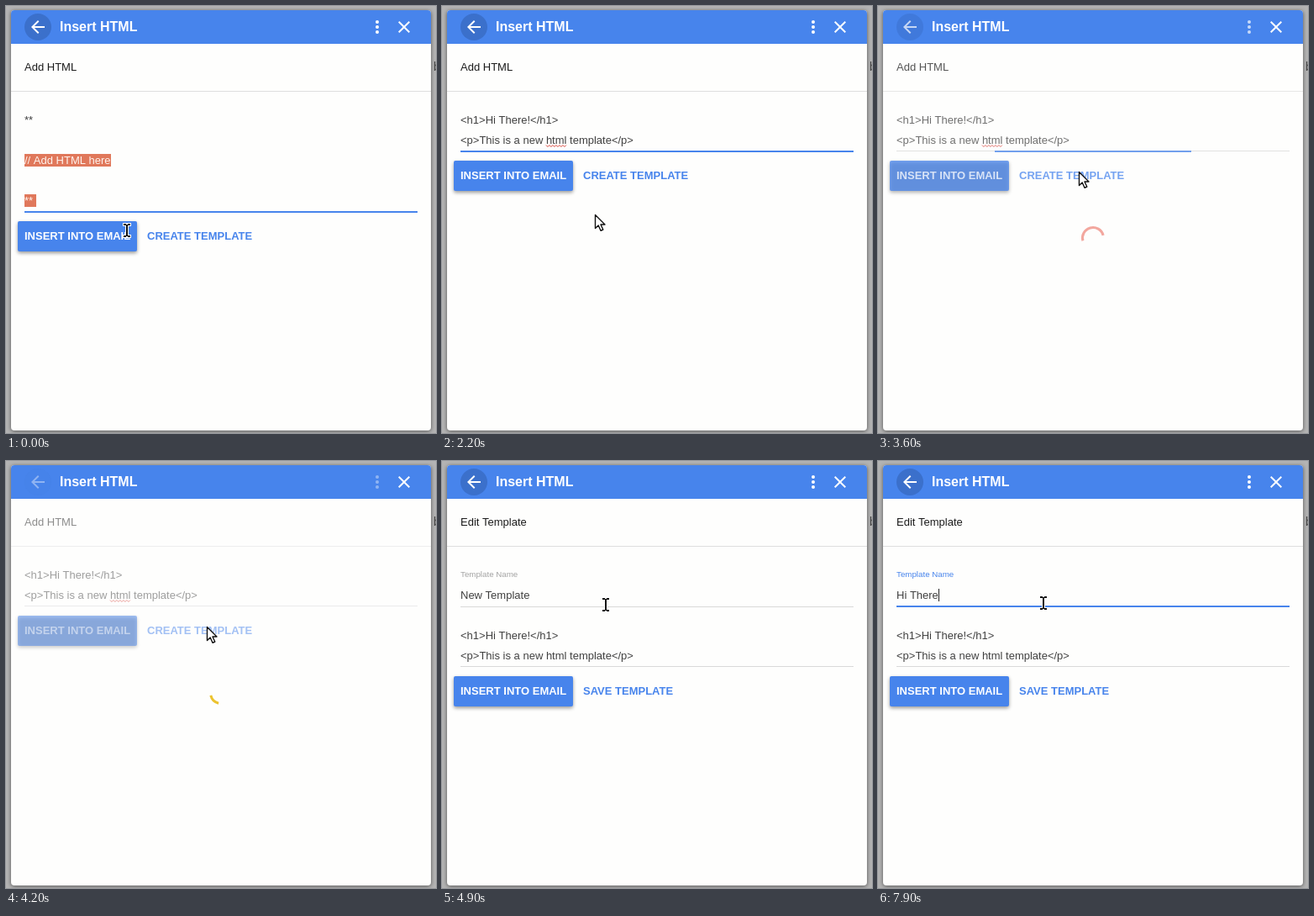
Animation of 512 by 508 pixels, one loop 8000 ms. Source, as an HTML page with a canvas:

```html
<!DOCTYPE html>
<html lang="en">
<head>
<meta charset="utf-8">
<title>Insert HTML dialog</title>
<style>
  html, body { margin: 0; width: 100%; height: 100%; overflow: hidden; background: #b3b3b3; }
  canvas { display: block; }
</style>
</head>
<body>
<canvas id="stage" width="512" height="508"></canvas>
<script>
const ctx = document.getElementById('stage').getContext('2d');
const LOOP = 8000, STEP = 100;
const BLUE = '#4784ec', INK = '#404040', PAPER = '#fefefd', PICK = '#e0785b';
const FONT = '"Liberation Sans", Arial, sans-serif';
const LINES = ['<h1>Hi There!</h1>', '<p>This is a new html template</p>'];
const BACK = new Path2D('M20 11H7.83l5.59-5.59L12 4l-8 8 8 8 1.41-1.41L7.83 13H20z');
const CROSS = new Path2D('M19 6.41L17.59 5 12 10.59 6.41 5 5 6.41 10.59 12 5 17.59 6.41 19 12 13.41 17.59 19 19 17.59 13.41 12z');
const ARROW = new Path2D('M.5.5V16.5L4.2 13 7 19.3 9.8 18 7 12H12z');
const HAND = new Path2D('M-.5 1.2Q1-.4 2.5 1.2V5.2Q4 4.4 5.2 5.6 6.8 4.8 8 6.2 10.6 5.6 10.8 8V11.5L9.5 15.5H.8L-3.4 10.4Q-4.4 8-2.2 8L-.5 9.4z');

// time, hot spot, pointer kind
const POINTER = [
  [0, 144, 267, 'beam'], [600, 144, 267, 'arrow'], [900, 246, 189, 'arrow'],
  [1500, 246, 189, 'arrow'], [1900, 196, 262, 'arrow'], [2200, 182, 248, 'arrow'],
  [2400, 208, 228, 'arrow'], [2700, 239, 197, 'hand'], [3600, 239, 197, 'arrow'],
  [4400, 239, 197, 'arrow'], [4800, 195, 171, 'beam'], [5000, 195, 171, 'beam'],
  [5400, 197, 169, 'beam'], [LOOP, 197, 169, 'beam']
];
const TYPING = [[6400, ''], [7100, 'H'], [7200, 'Hi'], [7400, 'Hi T'],
  [7700, 'Hi Th'], [7800, 'Hi Ther'], [7900, 'Hi There']];

const ramp = (t, a, b) => Math.min(1, Math.max(0, (t - a) / (b - a)));
const ease = p => p * p * (3 - 2 * p);

function setFont(size, weight) { ctx.font = `${weight || 'normal'} ${size}px ${FONT}`; }

function text(str, x, y, color = INK, size = 13, weight) {
  setFont(size, weight);
  ctx.fillStyle = color;
  ctx.fillText(str, x, y);
}

function rect(x, y, w, h, color) {
  ctx.fillStyle = color;
  ctx.fillRect(x, y, w, h);
}

function box(x, y, w, h, r, color) {
  ctx.fillStyle = color;
  ctx.beginPath();
  ctx.roundRect(x, y, w, h, r);
  ctx.fill();
}

function dot(x, y, r, color) {
  ctx.fillStyle = color;
  ctx.beginPath();
  ctx.arc(x, y, r, 0, Math.PI * 2);
  ctx.fill();
}

function shadow(color, blur, dy) {
  ctx.shadowColor = color;
  ctx.shadowBlur = blur;
  ctx.shadowOffsetY = dy;
}

function icon(path, x, y) {
  ctx.save();
  ctx.translate(x, y);
  ctx.fillStyle = '#fff';
  ctx.fill(path);
  ctx.restore();
}

function width(str) {
  setFont(13);
  return ctx.measureText(str).width;
}

function picked(str, y) {
  rect(22, y - 12, Math.round(width(str)), 15, PICK);
  text(str, 22, y, '#fff4ee');
}

function caret(str, y) { rect(Math.round(22 + width(str)), y - 12, 1, 15, '#222'); }

function focusLine(y, p) { rect(256 - 234 * p, y, 468 * p, 2, BLUE); }

function squiggle(before, word, y) {
  const x = 22 + width(before), end = x + width(word);
  ctx.strokeStyle = '#d8453c';
  ctx.lineWidth = 1;
  ctx.beginPath();
  for (let i = 0; x + i * 2 <= end; i++) ctx.lineTo(x + i * 2, y + (i % 2 ? 2 : 0));
  ctx.stroke();
}

function buttons(y, second) {
  ctx.save();
  shadow('rgba(0,0,0,.4)', 4, 2);
  box(14, y, 142, 36, 2, BLUE);
  ctx.restore();
  text('INSERT INTO EMAIL', 22, y + 22, '#fff', 13, 'bold');
  text(second, 168, y + 22, BLUE, 13, 'bold');
}

function frame(busy) {
  rect(0, 0, 512, 508, '#b4b4b4');
  text('b', 509, 77, '#444', 14);
  ctx.save();
  shadow('rgba(0,0,0,.55)', 5, 1);
  box(6, 5, 500, 500, 4, PAPER);
  ctx.restore();
  box(6, 5, 500, 40, [4, 4, 0, 0], BLUE);
  ctx.save();
  ctx.globalAlpha = 1 - busy * 0.95;
  dot(38, 25, 16, '#3b70cb');
  ctx.globalAlpha = 1 - busy * 0.6;
  icon(BACK, 26, 13);
  for (const dy of [-6, 0, 6]) dot(442, 25 + dy, 2, '#fff');
  ctx.restore();
  icon(CROSS, 462, 13);
  text('Insert HTML', 64, 30, '#fff', 16, 'bold');
}

function heading(str) {
  text(str, 22, 77, '#1c1c1c');
  rect(6, 101, 500, 1, '#dfdfdf');
}

function addPage(t, busy) {
  ctx.save();
  ctx.globalAlpha = 1 - busy * 0.5;
  heading('Add HTML');
  let rows = 5;
  if (t < 600) {
    if (t < 100) text('**', 22, 140);
    else picked('**', 140);
    picked('// Add HTML here', 188);
    picked('** ', 236);
  } else if (t < 1500) {
    rows = 1;
    if (t < 1100) caret('', 140);
  } else {
    rows = 2;
    LINES.forEach((line, i) => text(line, 22, 140 + i * 24));
    squiggle('<p>This is a new ', 'html', 165.5);
  }
  const y = 124 + rows * 24;
  rect(22, y, 468, 1, '#d9d9d9');
  if (busy < 1) focusLine(y, 1 - busy);
  buttons(y + 12, 'CREATE TEMPLATE');
  ctx.restore();
}

function editPage(t) {
  const focus = ease(ramp(t, 5530, 5750));
  heading('Edit Template');
  text('Template Name', 22, 138, focus ? BLUE : '#a3a3a3', 9.75);
  rect(22, 173, 468, 1, '#d9d9d9');
  if (focus) focusLine(172, focus);

  if (t >= 6400) {
    const name = TYPING.filter(k => k[0] <= t).pop()[1];
    text(name, 22, 164);
    if (t < 6900 || t >= 7100) caret(name, 164);
  } else if (t >= 5800) picked('New Template', 164);
  else text('New Template', 22, 164);

  LINES.forEach((line, i) => text(line, 22, 212 + i * 24));
  rect(22, 244, 468, 1, '#d9d9d9');
  buttons(256, 'SAVE TEMPLATE');
}

function spinner(t, alpha) {
  const phase = (t - 4000) / 1333;
  const sweep = (10 + 130 * (1 - Math.cos(phase * Math.PI * 2))) * Math.PI / 180;
  const mid = (135 + (t - 4200) * 0.4) * Math.PI / 180;
  ctx.save();
  ctx.globalAlpha = alpha;
  ctx.strokeStyle = phase < 0 ? '#e8503f' : '#ecc32f';
  ctx.lineWidth = 3;
  ctx.beginPath();
  ctx.arc(256, 276, 12.5, mid - sweep / 2, mid + sweep / 2);
  ctx.stroke();
  ctx.restore();
}

function beam() {
  const bars = [[-4, -8, 3, 2], [1, -8, 3, 2], [-1, -7, 2, 14], [-4, 6, 3, 2], [1, 6, 3, 2]];
  for (const [x, y, w, h] of bars) rect(x - 1, y - 1, w + 2, h + 2, '#fff');
  for (const [x, y, w, h] of bars) rect(x, y, w, h, '#111');
}

function outlined(path) {
  ctx.lineJoin = 'round';
  ctx.lineWidth = 1.4;
  ctx.fillStyle = '#fff';
  ctx.strokeStyle = '#111';
  ctx.fill(path);
  ctx.stroke(path);
}

function pointer(t) {
  const i = POINTER.findIndex(k => k[0] > t);
  const [t0, x0, y0, kind] = POINTER[i - 1], [t1, x1, y1] = POINTER[i];
  const p = ease(ramp(t, t0, t1));
  ctx.save();
  ctx.translate(Math.round(x0 + (x1 - x0) * p), Math.round(y0 + (y1 - y0) * p));
  if (kind === 'beam') beam();
  else if (kind === 'arrow') outlined(ARROW);
  else {
    outlined(HAND);
    for (const x of [3, 5.5, 8]) rect(x, 8, 1, 2, '#555');
  }
  ctx.restore();
}

function draw(t) {
  const busy = ramp(t, 3400, 3800) * (1 - ramp(t, 4400, 4600));
  frame(busy);
  if (t < 4600) addPage(t, busy);
  else editPage(t);
  if (busy) spinner(t, busy);
  pointer(t);
}

function tick(now) {
  draw(Math.floor(now % LOOP / STEP) * STEP);
  requestAnimationFrame(tick);
}
draw(0);
requestAnimationFrame(tick);
</script>
</body>
</html>
```
